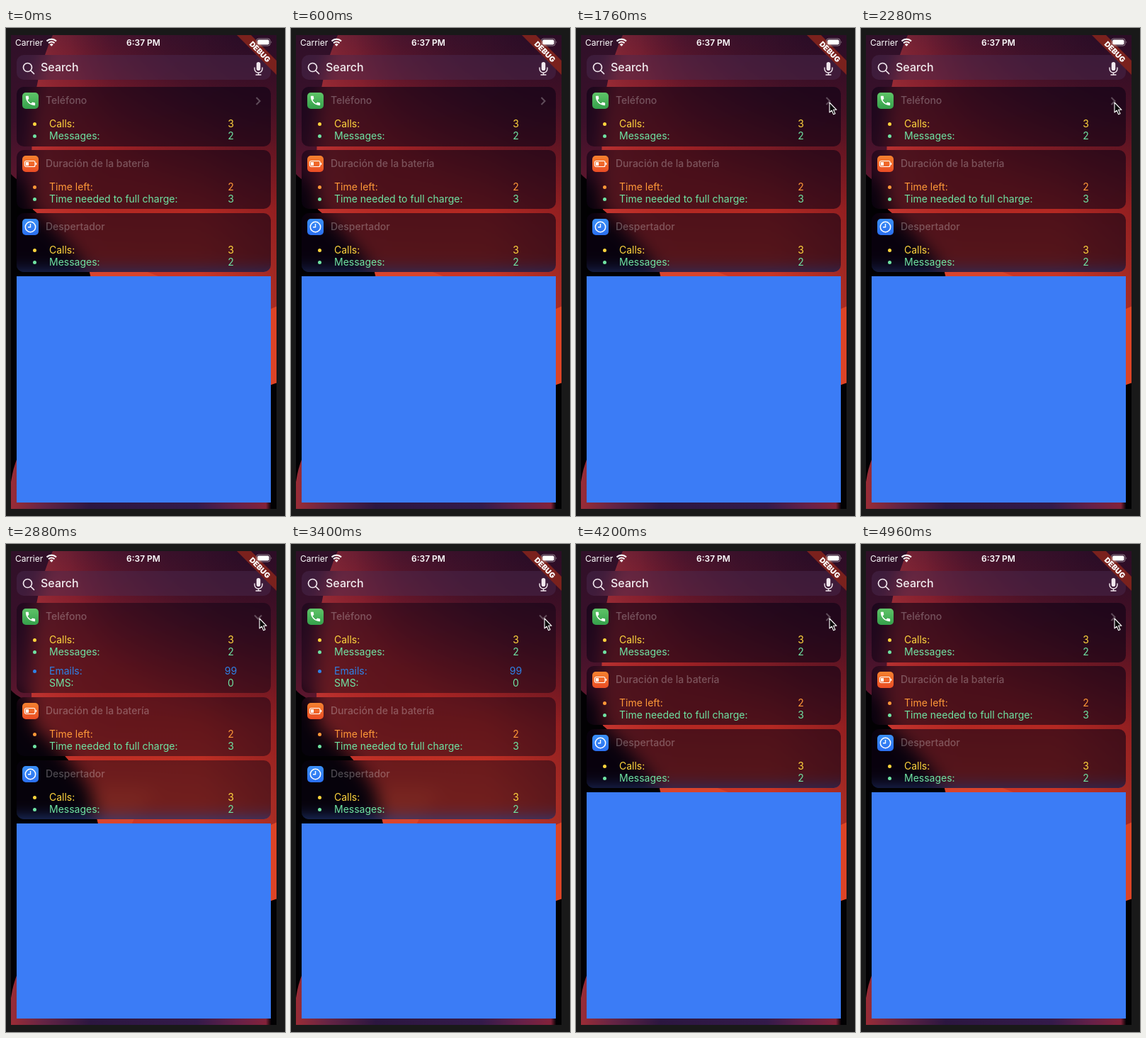
An HTML page for the animation above (5000 ms loop, 394 by 688 pixels).

```html
<!DOCTYPE html>
<html lang="en">
<head>
<meta charset="utf-8">
<style>
  html, body { margin: 0; width: 100%; height: 100%; overflow: hidden; background: #191919; }
  svg { display: block; width: 394px; height: 688px; }
  text { font-family: Inter, Roboto, sans-serif; font-size: 14px; fill: #fff; }
  .title { font-weight: 500; opacity: .28; }
  .num { text-anchor: middle; }
</style>
</head>
<body>
<svg viewBox="0 0 394 688">
  <defs>
    <linearGradient id="red" x1="0" y1="10" x2="0" y2="510" gradientUnits="userSpaceOnUse">
      <stop offset="0" stop-color="#561730"/>
      <stop offset=".14" stop-color="#781a2b"/>
      <stop offset=".32" stop-color="#a02124"/>
      <stop offset=".5" stop-color="#b42822"/>
      <stop offset=".7" stop-color="#cb3726"/>
      <stop offset="1" stop-color="#d93f26"/>
    </linearGradient>
    <linearGradient id="shade">
      <stop offset="0" stop-color="#f05a50" stop-opacity=".28"/>
      <stop offset=".3" stop-color="#c03030" stop-opacity="0"/>
      <stop offset=".6" stop-color="#30051c" stop-opacity="0"/>
      <stop offset="1" stop-color="#30051c" stop-opacity=".38"/>
    </linearGradient>
    <radialGradient id="dusk" cx="340" cy="10" r="250" gradientUnits="userSpaceOnUse">
      <stop offset="0" stop-color="#1c0a24" stop-opacity=".75"/>
      <stop offset=".45" stop-color="#1c0a24" stop-opacity=".5"/>
      <stop offset="1" stop-color="#1c0a24" stop-opacity="0"/>
    </radialGradient>
    <linearGradient id="plum" x1="0" y1="0" x2="0" y2="1">
      <stop offset="0" stop-color="#2b1028"/>
      <stop offset=".6" stop-color="#3a102a"/>
      <stop offset="1" stop-color="#64182e"/>
    </linearGradient>
    <linearGradient id="base" x1="7" y1="0" x2="382" y2="0" gradientUnits="userSpaceOnUse">
      <stop offset="0" stop-color="#9a2c36"/>
      <stop offset=".12" stop-color="#662444"/>
      <stop offset=".3" stop-color="#2c1640"/>
      <stop offset=".7" stop-color="#341a4a"/>
      <stop offset=".85" stop-color="#662048"/>
      <stop offset=".96" stop-color="#84223a"/>
      <stop offset=".98" stop-color="#020103"/>
    </linearGradient>
    <linearGradient id="phone" x1="0" y1="0" x2="0" y2="1">
      <stop stop-color="#5fc468"/><stop offset="1" stop-color="#35a04b"/>
    </linearGradient>
    <linearGradient id="power" x1="0" y1="0" x2="0" y2="1">
      <stop stop-color="#f4822f"/><stop offset="1" stop-color="#ea4c25"/>
    </linearGradient>
    <linearGradient id="clock" x1="0" y1="0" x2="0" y2="1">
      <stop stop-color="#3b90f7"/><stop offset="1" stop-color="#2b6ff0"/>
    </linearGradient>
    <filter id="blur" filterUnits="userSpaceOnUse" x="-40" y="-40" width="474" height="768" color-interpolation-filters="sRGB">
      <feGaussianBlur stdDeviation="12"/>
    </filter>
    <clipPath id="screen"><rect x="7" y="10" width="375" height="668"/></clipPath>
    <clipPath id="panels">
      <rect x="15" y="38" width="359" height="35" rx="10"/>
      <rect class="grow" x="15" y="83" width="359" height="84" rx="10"/>
      <rect class="drop" x="15" y="172" width="359" height="83" rx="10"/>
      <rect class="drop" x="15" y="261" width="359" height="83" rx="10"/>
    </clipPath>
    <clipPath id="first"><rect class="grow" x="15" y="83" width="359" height="84"/></clipPath>
    <clipPath id="list"><rect x="15" y="80" width="359" height="589"/></clipPath>
    <path id="body" d="M80-40L66 10C48 50 40 90 38 130Q34 215 38 256Q85 294 118 344L130 394C150 450 230 530 374 503L434 482V-40Z"/>
    <g id="wall">
      <rect x="-40" y="-40" width="474" height="768" fill="#020103"/>
      <path d="M-40-40H120V240Q30 232 7 206L-40 170Z" fill="url(#plum)"/>
      <use href="#body" fill="url(#red)"/>
      <use href="#body" fill="url(#shade)"/>
      <use href="#body" fill="url(#dusk)"/>
      <path d="M434 370L374 396Q300 420 250 504Q310 516 374 503L434 482Z" fill="#dc4426"/>
      <path d="M200 344Q150 340 118 344L130 394L170 430Q172 380 215 350Z" fill="#e04a30" opacity=".7"/>
      <path d="M-40 728V690L7 640Q10 620 16 606Q60 560 200 610L374 650V728Z" fill="url(#base)"/>
    </g>
  </defs>

  <g clip-path="url(#screen)"><use href="#wall"/></g>
  <g clip-path="url(#list)"><rect class="drop" x="15" y="350" width="359" height="319" fill="#3b7cf6"/></g>

  <g clip-path="url(#panels)">
    <g filter="url(#blur)">
      <use href="#wall"/>
      <rect class="drop" x="-10" y="344" width="414" height="340" fill="#3b7cf6"/>
    </g>
    <rect id="tint" y="78" width="394" height="600" fill="#0c0314"/>
    <rect y="30" width="394" height="46" fill="#4b2c50" opacity=".45"/>
  </g>

  <g fill="none" stroke="#f2e8ee" stroke-width="1.7" stroke-linecap="round">
    <circle cx="30.500" cy="55.500" r="6"/><path d="M35 60L39.500 64.500"/>
    <path d="M351 56v1.500a5.500 5.500 0 0 0 11 0V56M356.500 63.500V66M353 66h7" stroke-width="1.400"/>
    <rect x="353.700" y="48" width="5.600" height="12" rx="2.800" fill="#f2e8ee" stroke="none"/>
  </g>
  <text x="49" y="61" style="font-size:16px;font-weight:500" fill-opacity=".92">Search</text>

  <g id="cards"></g>
  <g clip-path="url(#first)" id="extra"></g>
  <path id="chevron" d="M-2.500-5L2.500 0L-2.500 5" fill="none" stroke="#fff" stroke-opacity=".28" stroke-width="2"/>

  <g clip-path="url(#screen)">
    <path d="M326 10H346L382 46V66Z" fill="#7a211d"/>
    <text transform="translate(358.500 33.500) rotate(45)" y="3.700" text-anchor="middle" style="font-size:10.500px;font-weight:900">DEBUG</text>
  </g>
  <text x="13" y="24.500" style="font-size:12px">Carrier</text>
  <text x="194" y="24.500" text-anchor="middle" style="font-size:12px;font-weight:600">6:37 PM</text>
  <g fill="none" stroke="#fff" stroke-width="2">
    <path d="M57.500 18.500a9.500 9.500 0 0 1 13.500 0M60 21.300a6 6 0 0 1 8.500 0"/>
    <path d="M61.800 23.200a3.500 3.500 0 0 1 4.900 0L64.250 25.800Z" fill="#fff" stroke="none"/>
  </g>
  <rect x="353.500" y="15" width="19.500" height="10" rx="3" fill="none" stroke="#fff" stroke-opacity=".45"/>
  <rect x="355" y="16.500" width="16.500" height="7" rx="1.800" fill="#fff"/>
  <path d="M374.500 18.500q1.500 1.500 0 3Z" fill="#fff" opacity=".6"/>

  <path id="cursor" d="M0 0V14L3.200 11.100L5.600 16.800L8 15.800L5.600 10.300H10Z" fill="#080808" stroke="#fff" stroke-width="1.100" stroke-linejoin="round"/>
</svg>
<script>
  const LOOP = 5000, STEP = 40, SHIFT = 44;
  const YELLOW = '#ffd53d', GREEN = '#6fe3a3', ORANGE = '#ff9838', BLUE = '#2f82e6';
  const $ = id => document.getElementById(id);

  const row = (y, color, label, value, dot = true) =>
    (dot ? `<circle cx="40.500" cy="${y - 4.5}" r="2.500" fill="${color}"/>` : '') +
    `<text x="61" y="${y}" style="fill:${color}">${label}</text>` +
    `<text class="num" x="317.500" y="${y}" style="fill:${color}">${value}</text>`;

  const glyphs = {
    phone: `<path transform="translate(2.600 2.600) scale(.74)" fill="#fff" d="M6.600 10.800c1.400 2.800 3.800 5.100 6.600 6.600l2.200-2.200c.3-.3.7-.4 1-.2 1.100.4 2.300.6 3.600.6.6 0 1 .4 1 1V20c0 .6-.4 1-1 1C10.600 21 3 13.400 3 4c0-.6.5-1 1-1h3.500c.6 0 1 .4 1 1 0 1.300.2 2.500.6 3.600.1.3 0 .7-.2 1z"/>`,
    power: `<rect x="3.500" y="7.500" width="14.500" height="8" rx="2" fill="none" stroke="#fff" stroke-width="1.200"/>
      <rect x="5" y="9" width="4" height="5" fill="#fff"/><path d="M19.500 10v3" stroke="#fff" stroke-width="1.400"/>`,
    clock: `<circle cx="11.500" cy="11.500" r="7.200" fill="none" stroke="#fff" stroke-width="1.500"/>
      <path d="M11.500 7v4.800H8" fill="none" stroke="#fff" stroke-width="1.400"/>`
  };

  const cards = [
    ['phone', 'Teléfono', [YELLOW, 'Calls:', 3], [GREEN, 'Messages:', 2]],
    ['power', 'Duración de la batería', [ORANGE, 'Time left:', 2], [GREEN, 'Time needed to full charge:', 3]],
    ['clock', 'Despertador', [YELLOW, 'Calls:', 3], [GREEN, 'Messages:', 2]]
  ];
  $('cards').innerHTML = cards.map(([icon, title, a, b], i) => {
    const y = 83 + 89 * i;
    return `<g class="${i ? 'drop' : ''}">
      <g transform="translate(23 ${y + 8})"><rect width="23" height="23" rx="5" fill="url(#${icon})"/>${glyphs[icon]}</g>
      <text class="title" x="56" y="${y + 24}">${title}</text>
      ${row(y + 57, ...a)}${row(y + 74, ...b)}</g>`;
  }).join('');
  $('extra').innerHTML = row(184, BLUE, 'Emails:', 99) + row(201, GREEN, 'SMS:', 0, false);

  const drops = document.querySelectorAll('.drop');
  const grows = document.querySelectorAll('.grow');
  const ramp = (t, from, to) => Math.min(1, Math.max(0, (t - from) / (to - from)));
  const easeIn = p => p * p * (1.4 - .4 * p);
  const easeOut = p => 1 - (1 - p) ** 3;

  function draw(t) {
    const open = easeIn(t < 3400 ? ramp(t, 2440, 2640) : 1 - ramp(t, 3640, 3840));
    drops.forEach(el => el.setAttribute('transform', `translate(0 ${SHIFT * open})`));
    grows.forEach(el => el.setAttribute('height', 84 + (SHIFT - 1) * open));
    $('tint').setAttribute('opacity', .6 - .13 * open);
    $('chevron').setAttribute('transform', `translate(356 103) rotate(${90 * open})`);

    const move = easeOut(ramp(t, 1240, 1720));
    $('cursor').setAttribute('transform', `translate(${398 - 40 * move} ${150 - 45 * move})`);
  }

  function tick() {
    const t = performance.now() % LOOP;
    draw(Math.floor(t / STEP) * STEP);
    requestAnimationFrame(tick);
  }
  tick();
</script>
</body>
</html>
```
